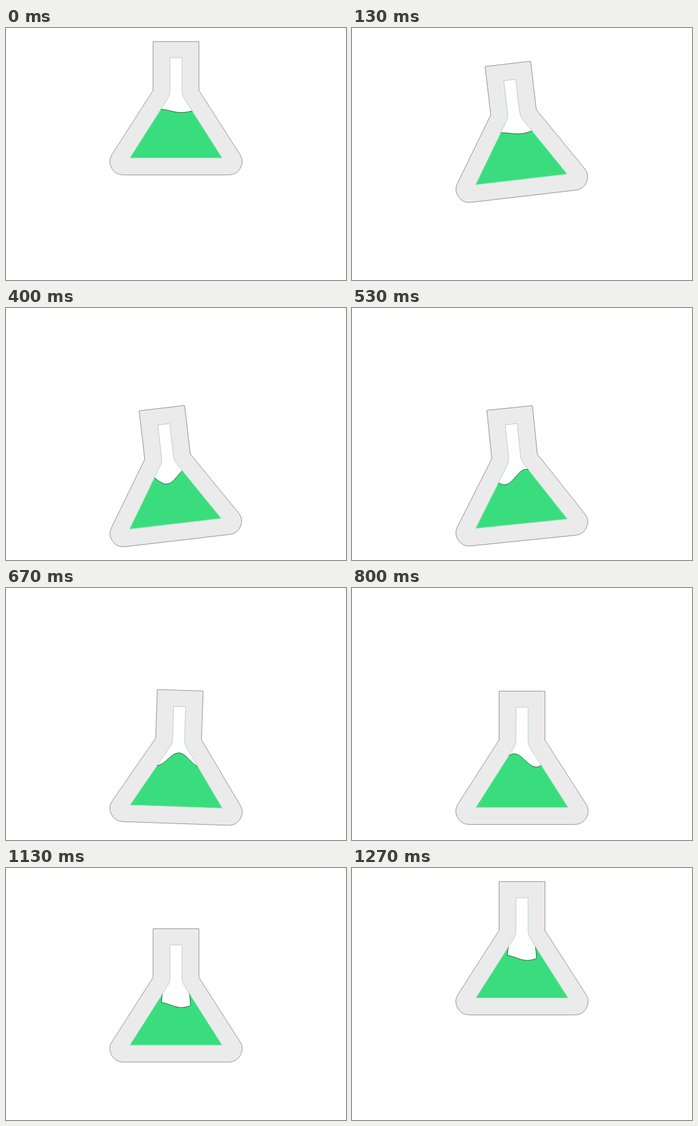
Write an HTML page that moves like this. It is 512x380 px and loops after 1340 ms.

```html
<!DOCTYPE html>
<html lang="en">
<head>
<meta charset="utf-8">
<title>Flask</title>
<style>
  html, body { margin: 0; width: 100%; height: 100%; overflow: hidden; background: #fff; }
  svg { display: block; width: 512px; height: 380px; }
  .glass { fill: #ebebeb; stroke: #858585; stroke-width: .8; }
  .liquid { fill: #3add7e; stroke: #a9e9c3; stroke-width: .8; }
  .air { fill: #fff; stroke: #c4c4c4; stroke-width: .7; }
  .surface { fill: none; stroke: #22633f; stroke-width: .9; stroke-linejoin: round; }
</style>
</head>
<body>
<svg viewBox="0 0 512 380">
  <defs>
    <path id="inner" d="M247 45H265V95Q265 101 268.3 106L325.5 196H186.5L243.7 106Q247 101 247 95Z"/>
    <path id="wave"/>
    <clipPath id="inside"><use href="#inner"/></clipPath>
    <clipPath id="above"><use href="#wave"/></clipPath>
  </defs>
  <g id="flask">
    <path class="glass" d="M221.5 20.5H290.5V94L352.3 190.6A20 20 0 0 1 335.5 221.5H176.5A20 20 0 0 1 159.7 190.6L221.5 94Z"/>
    <use class="liquid" href="#inner"/>
    <g clip-path="url(#above)"><use class="air" href="#inner"/></g>
    <g clip-path="url(#inside)"><use class="surface" href="#wave"/></g>
  </g>
</svg>
<script>
const LOOP = 1340, STEPS = 20, MID = 256;
const RIPPLE = 10.5, WAVELENGTH = 2 * Math.PI * RIPPLE;
const flask = document.getElementById('flask');
const wave = document.getElementById('wave');

// Progress from 0 to 1 between two steps
const ramp = (s, from, to) => Math.min(1, Math.max(0, (s - from) / (to - from)));
const ease = (s, from, to) => (1 - Math.cos(Math.PI * ramp(s, from, to))) / 2;

// Fall, settle, then spring back up
const drop = s => (129.3 * ease(s, 0, 6) + 5.7 * ease(s, 8, 11)) * (1 - ease(s, 16, 18.07));

// Lean left, rock past upright, come to rest
const tilt = s => -6.66 * ramp(s, 0, 2) + 8.66 * ease(s, 7.5, 10) - 2 * ease(s, 10, 12);

// A ripple crosses the liquid once, then sinks into a rounded bubble
function surface(s) {
  const sink = ramp(s, 14, 17);
  const level = 125 + 10.5 * sink;
  const height = 2.5 + 7.5 * ramp(s, 2, 6) - 6.2 * sink;
  const dip = 8 - WAVELENGTH * ramp(s, 4, 14);
  const half = 44 - 22 * sink;
  let d = `M${MID - half + 4} 0V90`;
  for (let x = -half; x <= half; x += 2) {
    d += `L${MID + x} ${level + height * Math.cos((x - dip) / RIPPLE)}`;
  }
  return d + `L${MID + half - 4} 90V0`;
}

// Fifteen steps a second, on a 10 ms clock
const stepAt = ms => Math.min(STEPS - 1, Math.floor((Math.floor(ms / 10) * 3 + 1) / 20));

function draw(s) {
  flask.setAttribute('transform', `translate(0 ${drop(s)}) rotate(${tilt(s)} ${MID} 204)`);
  wave.setAttribute('d', surface(s));
}

let shown = -1;
function tick() {
  const step = stepAt(performance.now() % LOOP);
  if (step !== shown) draw(shown = step);
  requestAnimationFrame(tick);
}
tick();
</script>
</body>
</html>
```
